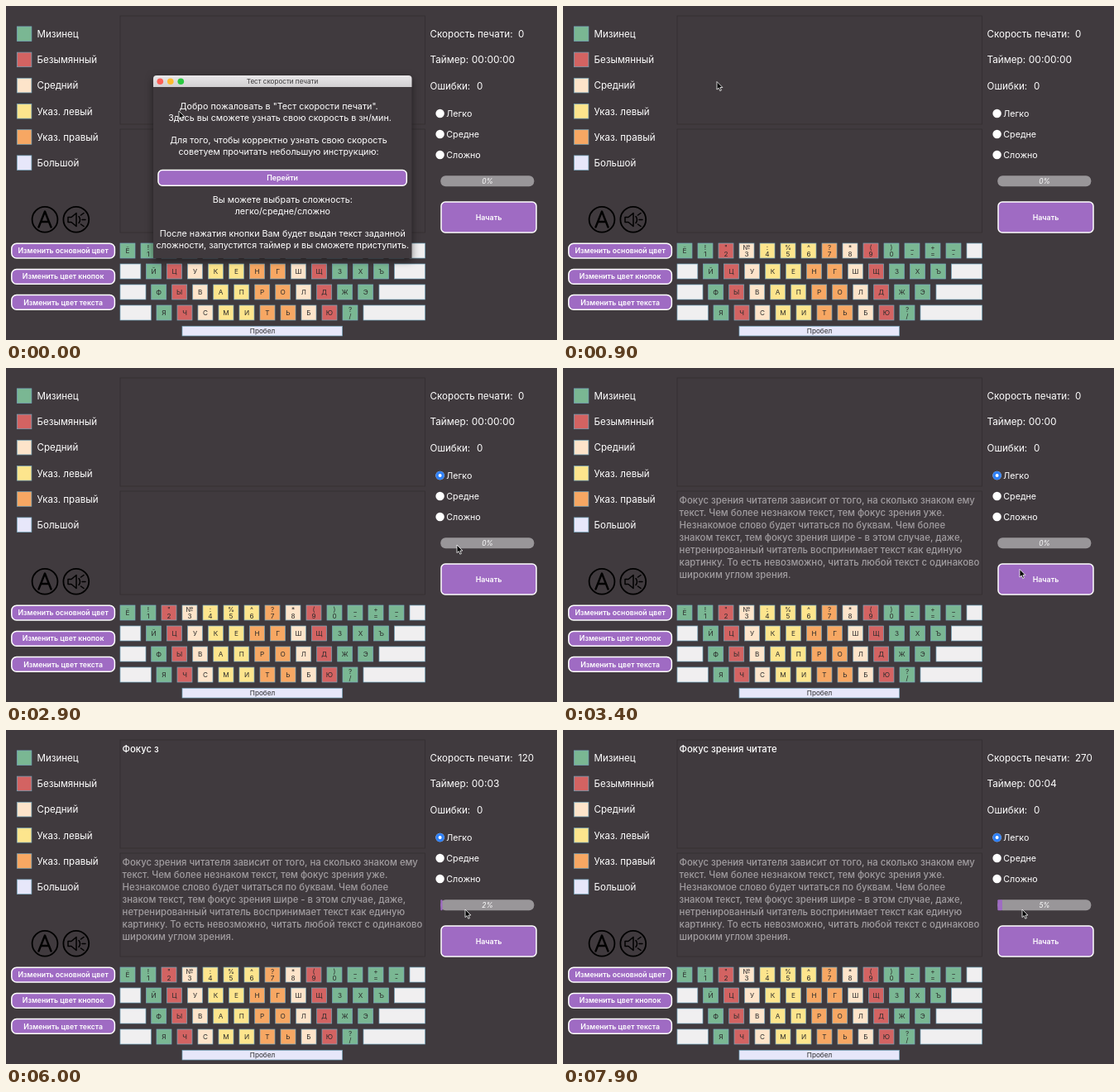
Write an HTML page that moves like this. It is 666 px wide and 404 px high and loops after 8 s.

```html
<!DOCTYPE html>
<html lang="ru">
<head>
<meta charset="utf-8">
<title>Тест скорости печати</title>
<style>
html, body { margin: 0; width: 100%; height: 100%; overflow: hidden; background: #403a3e; }
svg { display: block; width: 666px; height: 404px; font-family: Inter, "Open Sans", sans-serif; }
text { white-space: pre; }
</style>
</head>
<body>
<svg id="stage" viewBox="0 0 666 404"></svg>
<script>
const LOOP = 8000, STEP = 100;
const BG = '#403a3e', PURPLE = '#9f6bc3', WHITE = '#fff', INK = '#2b2b2b';
const FINGER = { g: '#7ab793', r: '#d36362', c: '#fde4ca', y: '#fde58d', o: '#f7a763', l: '#e7e7fa', w: '#f0eff0' };
const EDGE = { stroke: '#74a6bd', 'stroke-width': 0.7 };
const stage = document.getElementById('stage');

function add(tag, attrs, parent = stage) {
  const node = document.createElementNS('http://www.w3.org/2000/svg', tag);
  for (const key in attrs) node.setAttribute(key, attrs[key]);
  parent.append(node);
  return node;
}

function rect(x, y, width, height, attrs, parent) {
  return add('rect', { x, y, width, height, ...attrs }, parent);
}

// y is the middle of the capital letters
function label(content, x, y, size, attrs = {}, parent = stage) {
  const node = add('text', { x, y: y + size * 0.363, 'font-size': size, fill: WHITE, ...attrs }, parent);
  node.textContent = content;
  return node;
}

const centered = { 'text-anchor': 'middle' };

function button(x, y, w, h, content, size, radius, parent) {
  rect(x, y, w, h, { rx: radius, fill: PURPLE, stroke: WHITE, 'stroke-width': 1.5 }, parent);
  label(content, x + w / 2, y + h / 2, size, { ...centered, 'font-weight': 600 }, parent);
}

function key(x, y, w, finger, chars = '') {
  rect(x, y, w, 18, { fill: FINGER[finger], ...EDGE });
  const rows = [...chars];
  rows.forEach((char, i) => {
    const offset = rows.length > 1 ? (i ? 4.3 : -4.3) : 0;
    label(char, x + w / 2, y + 9.2 + offset, 8.2, { ...centered, fill: INK });
  });
}

// Legend
['Мизинец', 'Безымянный', 'Средний', 'Указ. левый', 'Указ. правый', 'Большой'].forEach((name, i) => {
  const y = 33.7 + i * 31.2;
  rect(13.3, y - 8.8, 17.6, 17.6, { fill: FINGER['grcyol'[i]], ...EDGE });
  label(name, 37.5, y + 0.2, 11.55);
});

// Icons
const outline = { fill: 'none', stroke: '#000', 'stroke-width': 1.8, 'stroke-linecap': 'round', 'stroke-linejoin': 'round' };
add('circle', { cx: 47, cy: 258.3, r: 15.4, ...outline });
add('circle', { cx: 84.8, cy: 258.3, r: 15.4, ...outline });
add('path', { d: 'M39.5 267.5 L47 248.5 L54.5 267.5 M42.3 261 H51.7', ...outline, 'stroke-width': 2.4 });
add('path', {
  d: 'M75 255.5 h4 l6 -5 v16 l-6 -5 h-4 z M88 254.5 q3 4 0 8 M90.5 253 l3.5 -2.5 M92 258.5 h4 M90.5 264 l3.5 2.5',
  ...outline, 'stroke-width': 1.5
});

['Изменить основной цвет', 'Изменить цвет кнопок', 'Изменить цвет текста'].forEach((name, i) =>
  button(6.8, 287.3 + i * 31.1, 124.6, 17.8, name, 8.7, 6));

// Text areas
const frame = { fill: 'none', stroke: '#332d31', 'stroke-width': 0.8 };
rect(138, 12, 368.5, 131, frame);
rect(138, 149, 368.5, 125, frame);

const passage = [
  'Фокус зрения читателя зависит от того, на сколько знаком ему',
  'текст. Чем более незнаком текст, тем фокус зрения уже.',
  'Незнакомое слово будет читаться по буквам. Чем более',
  'знаком текст, тем фокус зрения шире - в этом случае, даже,',
  'нетренированный читатель воспринимает текст как единую',
  'картинку. То есть невозможно, читать любой текст с одинаково',
  'широким углом зрения.'
];
const fullText = passage.join(' ');
const PASSAGE_SIZE = 11.35;
const task = add('g', { 'font-weight': 500 });
passage.forEach((line, i) => label(line, 140.6, 159.9 + i * 15.05, PASSAGE_SIZE, { fill: '#a19da0' }, task));
const typed = label('', 140.6, 22.6, PASSAGE_SIZE, { 'font-weight': 500 });

// Keyboard
const rows = [
  { x: 138, y: 287, chars: 'Ё !1 "2 №3 :4 %5 ^6 ?7 *8 (9 )0 _- += _-', fingers: 'ggrcyyyocrgggg', end: 488 },
  { x: 169.5, y: 312, chars: 'Й Ц У К Е Н Г Ш Щ З Х Ъ', fingers: 'grcyyoocrggg', end: 469.5 },
  { x: 175.7, y: 337, chars: 'Ф Ы В А П Р О Л Д Ж Э', fingers: 'grcyyoocrgg', end: 451 },
  { x: 182, y: 362, chars: 'Я Ч С М И Т Ь Б Ю ?/', fingers: 'grcyyoocrg', end: 432 }
];
for (const row of rows) {
  if (row.x > 138) key(138, row.y, row.x - 144.7, 'w');
  row.chars.split(' ').forEach((chars, i) => key(row.x + i * 25, row.y, 18, row.fingers[i], chars));
  key(row.end, row.y, 506.5 - row.end, 'w');
}
rect(213, 387.3, 193.5, 11.7, { fill: FINGER.l, ...EDGE });
label('Пробел', 310, 393.3, 8.2, { ...centered, fill: INK });

// Status panel
label('Скорость печати:', 512.6, 33.8, 11.6);
label('Таймер:', 512.6, 65.1, 11.7);
label('Ошибки:', 512.6, 96.4, 11.6);
const speed = label('0', 619, 33.8, 11.6);
const timer = label('', 562.8, 65.1, 12);
label('0', 569, 96.4, 11.6);

['Легко', 'Средне', 'Сложно'].forEach((name, i) => {
  const y = 130 + i * 25;
  add('circle', { cx: 524.6, cy: y, r: 5.2, fill: WHITE });
  label(name, 532.3, y + 0.3, 10.7);
});
const choice = add('g', {});
add('circle', { cx: 524.6, cy: 130, r: 5.2, fill: '#2f80f6' }, choice);
add('circle', { cx: 524.6, cy: 130, r: 2, fill: WHITE }, choice);

rect(525.3, 205.3, 113, 13, { rx: 6, fill: '#999699' });
const bar = rect(525.3, 205.3, 0, 13, { rx: 1, fill: PURPLE });
const percent = label('0%', 582, 211.7, 8.4, { ...centered, 'font-style': 'italic' });
button(526, 237, 115, 37, 'Начать', 8.9, 5);

// Welcome window
const dialog = add('g', {});
const shade = add('g', { style: 'filter: drop-shadow(0 3px 5px rgba(0,0,0,.5))' }, dialog);
add('path', { d: 'M178 305 V88 q0 -4 4 -4 H486.5 q4 0 4 4 V305 z', fill: BG }, shade);
const shine = add('linearGradient', { id: 'shine', x2: 0, y2: 1 }, dialog);
add('stop', { offset: 0, 'stop-color': '#e9e7e9' }, shine);
add('stop', { offset: 1, 'stop-color': '#d1cfd1' }, shine);
add('path', { d: 'M178 98 V88 q0 -4 4 -4 H486.5 q4 0 4 4 V98 z', fill: 'url(#shine)' }, dialog);
['#fc5f57', '#fdbc2f', '#29c840'].forEach((fill, i) =>
  add('circle', { cx: 186.3 + i * 12.5, cy: 91.3, r: 3.8, fill }, dialog));
const hover = add('g', { fill: 'none', stroke: '#4a1c10', 'stroke-width': 0.9 }, dialog);
add('circle', { cx: 186.3, cy: 91.3, r: 3.8, fill: '#c9453f', stroke: 'none' }, hover);
add('path', { d: 'M184.5 89.5 l3.6 3.6 m0 -3.6 l-3.6 3.6 M196.5 91.3 h4.6 M209.6 93 l3.4 -3.4' }, hover);
label('Тест скорости печати', 334, 91.5, 8.1, { ...centered, fill: '#3b393b' }, dialog);
[
  [121.3, 'Добро пожаловать в "Тест скорости печати".', 329.7],
  [135, 'Здесь вы сможете узнать свою скорость в зн/мин.', 331],
  [162.3, 'Для того, чтобы корректно узнать свою скорость', 329.5],
  [176.2, 'советуем прочитать небольшую инструкцию:', 329.5],
  [234.2, 'Вы можете выбрать сложность:', 334.3],
  [248.2, 'легко/средне/сложно', 334.3],
  [275.5, 'После нажатия кнопки Вам будет выдан текст заданной', 334.3],
  [289.4, 'сложности, запустится таймер и вы сможете приступить.', 334.3]
].forEach(([y, line, x]) => label(line, x, y, 10.75, centered, dialog));
button(184, 198.5, 300.3, 18.7, 'Перейти', 8.8, 5, dialog);

const pointer = add('path', {
  d: 'M0 -1 V8.6 L2.2 6.6 L3.8 10.2 L5.4 9.5 L3.9 6 H6.9 Z',
  fill: '#000', stroke: WHITE, 'stroke-width': 0.8
});

// Timeline: [ms, ...]
const CLOSE = 900, CHOOSE = 2300, START = 3300;
const pointerPath = [
  [0, 209, 128], [100, 208, 126], [400, 197, 108], [700, 186, 92.5], [1000, 186, 92.5],
  [1300, 300, 113], [1700, 479, 139], [1800, 533, 133], [1900, 537, 130], [2200, 537, 130],
  [2500, 539, 160], [2900, 545, 215], [3200, 552, 244], [3700, 552, 245], [4000, 552, 238], [4200, 555, 218]
];
const keystrokes = [
  [4400, 1], [5000, 2], [5200, 4], [5600, 5], [6000, 7], [6300, 8], [6500, 9], [6600, 10], [6800, 11],
  [7000, 12], [7200, 14], [7400, 15], [7500, 16], [7600, 17], [7800, 18], [7900, 19]
];
const ticks = [[4200, 1], [5200, 2], [6000, 3], [7000, 4]];

const valueAt = (steps, t) => steps.reduce((value, [at, next]) => (t >= at ? next : value), 0);

function pointAt(t) {
  const i = pointerPath.findIndex(([at]) => at > t);
  if (i < 0) return pointerPath.at(-1).slice(1);
  const [t0, x0, y0] = pointerPath[i - 1], [t1, x1, y1] = pointerPath[i];
  const k = (t - t0) / (t1 - t0);
  return [x0 + (x1 - x0) * k, y0 + (y1 - y0) * k];
}

const show = (node, visible) => node.setAttribute('visibility', visible ? 'visible' : 'hidden');

function render(t) {
  const count = valueAt(keystrokes, t), seconds = valueAt(ticks, t);
  const scored = Math.max(0, count - 1);
  const done = Math.round(scored * 100 / fullText.length);
  show(dialog, t < CLOSE);
  show(hover, t >= 700 && t < CLOSE);
  show(choice, t >= CHOOSE);
  show(task, t >= START);
  typed.textContent = fullText.slice(0, count);
  speed.textContent = seconds ? Math.floor(scored * 60 / seconds) : 0;
  timer.textContent = t < START ? '00:00:00' : '00:0' + seconds;
  percent.textContent = done + '%';
  bar.setAttribute('width', done * 1.13);
  pointer.setAttribute('transform', `translate(${pointAt(t)})`);
}

const begin = performance.now();
function tick() {
  const t = (performance.now() - begin) % LOOP;
  render(Math.floor(t / STEP) * STEP);
  requestAnimationFrame(tick);
}
tick();
</script>
</body>
</html>
```
